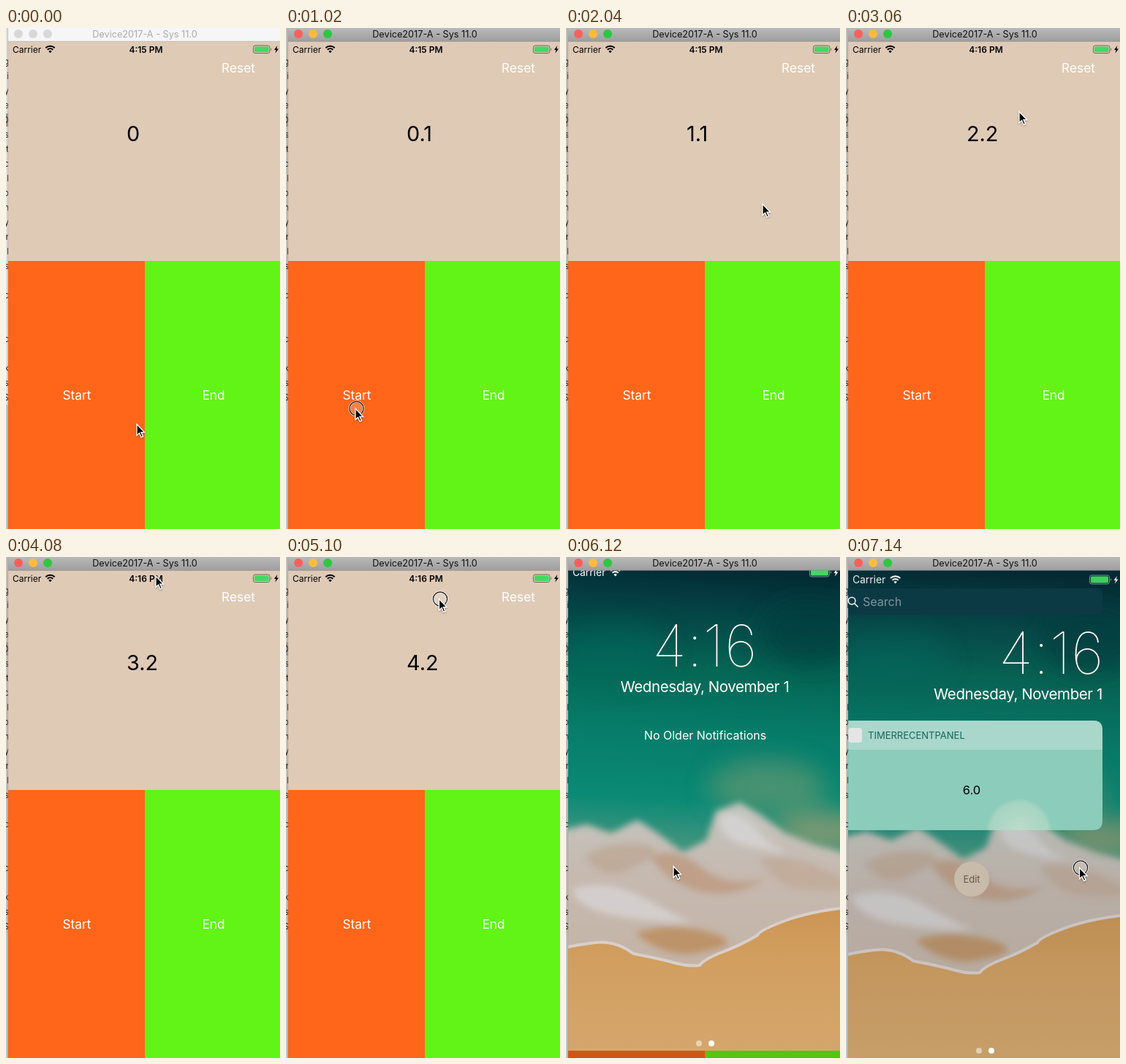
Animation, 375 px wide and 686 px high, one loop 8000 ms. Source, as an HTML page:

```html
<!DOCTYPE html>
<html lang="en">
<head>
<meta charset="utf-8">
<title>Stopwatch</title>
<style>
  html, body { margin: 0; width: 100%; height: 100%; overflow: hidden; background: #dfcab6; }
  svg { display: block; width: 100%; height: 100%; }
  text { font-family: Inter, "Open Sans", sans-serif; }
  .mid { text-anchor: middle; }
  .end { text-anchor: end; }
  .label { font-size: 17.3px; fill: #fff; text-anchor: middle; }
  .time { font-size: 79px; font-weight: 100; letter-spacing: .5px; }
  .date { font-size: 20.5px; letter-spacing: -.4px; }
</style>
</head>
<body>
<svg viewBox="0 0 375 686">
  <defs>
    <linearGradient id="barOn" x2="0" y2="1">
      <stop stop-color="#b9b9b9"/><stop offset="1" stop-color="#9e9e9e"/>
    </linearGradient>
    <linearGradient id="sea" gradientUnits="userSpaceOnUse" x1="170" y1="18" x2="150" y2="400">
      <stop stop-color="#032832"/><stop offset=".15" stop-color="#044044"/>
      <stop offset=".38" stop-color="#056655"/><stop offset=".6" stop-color="#067c69"/>
      <stop offset=".85" stop-color="#0b8a75"/><stop offset="1" stop-color="#3f947d"/>
    </linearGradient>
    <linearGradient id="sand" x2="0" y2="1">
      <stop stop-color="#cb9250"/><stop offset=".4" stop-color="#d19e5f"/><stop offset="1" stop-color="#d5a66c"/>
    </linearGradient>
    <linearGradient id="surf" x2="0" y2="1">
      <stop stop-color="#c3c6bf"/><stop offset=".4" stop-color="#c6b9b0"/><stop offset="1" stop-color="#c4b3a5"/>
    </linearGradient>
    <radialGradient id="glow" gradientUnits="userSpaceOnUse" cx="237" cy="376" r="46">
      <stop stop-color="#cfe0cf" stop-opacity=".75"/><stop offset=".85" stop-color="#b9dbc8" stop-opacity=".6"/>
      <stop offset="1" stop-color="#b9dbc8" stop-opacity="0"/>
    </radialGradient>
    <filter id="soft" x="-60%" y="-60%" width="220%" height="220%"><feGaussianBlur stdDeviation="16"/></filter>
    <filter id="fuzz" x="-20%" y="-20%" width="140%" height="140%"><feGaussianBlur stdDeviation="5"/></filter>
    <filter id="shade" x="-50%" y="-50%" width="200%" height="200%">
      <feDropShadow dx="0" dy="1" stdDeviation=".9" flood-opacity=".4"/>
    </filter>
    <clipPath id="phone"><path d="M3 18h372v668H3z"/></clipPath>
    <path id="shore" d="M385 490Q335 495 300 508T262 528Q238 542 214 551T183 569Q168 571 150 566T92 553Q68 535 40 538T-8 547"/>
    <clipPath id="water"><path d="M-8 18H385V490Q335 495 300 508T262 528Q238 542 214 551T183 569Q168 571 150 566T92 553Q68 535 40 538T-8 547z"/></clipPath>
    <g id="wifi" fill="none" stroke="currentColor" stroke-width="2">
      <path d="M.8 3.7a9 9 0 0 1 12.4 0M3.2 6.3a5.5 5.5 0 0 1 7.6 0"/>
      <path d="M7 10.7 4.9 8.4a3 3 0 0 1 4.2 0z" fill="currentColor" stroke="none"/>
    </g>
    <path id="bolt" d="M4.4 0 0 6h2.6L1.5 10.5 6 4.4H3.3z" fill="currentColor"/>
  </defs>

  <!-- sliver of the desktop behind the window -->
  <rect id="desk" width="3" height="686"/>
  <path d="M0 117h3v18H0z" fill="#999"/>
  <path d="M0 516h3v170H0z" fill="#b4c8d2"/>
  <g id="slivers" font-size="12" fill="#222" class="end"></g>
  <path d="M2.6 0v686" stroke="#777" stroke-opacity=".45" stroke-width=".8"/>

  <g id="app">
    <path d="M3 18h372v301H3z" fill="#dfcab6"/>
    <path d="M3 319h187v367H3z" fill="#ff661a"/>
    <path d="M190 319h185v367H190z" fill="#62f317"/>
    <g color="#000">
      <text x="9" y="33.5" font-size="12">Carrier</text>
      <use href="#wifi" x="53.5" y="23.5"/>
      <text id="clock" class="mid" x="191.5" y="33.5" font-size="12" font-weight="600"></text>
      <rect x="338.5" y="24" width="22.5" height="10.5" rx="2.6" fill="none" stroke="#6d655c"/>
      <rect x="340" y="25.5" width="19.5" height="7.5" rx="1.4" fill="#44d862"/>
      <path d="M362.6 27.3q2 2 0 4z" fill="#6d655c"/>
      <use href="#bolt" x="367" y="24"/>
    </g>
    <text class="label" x="318" y="60.5">Reset</text>
    <text id="count" x="165" y="154.5" font-size="28.8"></text>
    <text class="label" x="97" y="509">Start</text>
    <text class="label" x="284" y="509">End</text>
  </g>
  <path id="dim" d="M3 18h372v668H3z" fill-opacity=".18"/>

  <g id="cover">
    <g clip-path="url(#phone)">
      <path d="M3 470h372v216H3z" fill="url(#sand)"/>
      <g clip-path="url(#water)">
        <path d="M3 18h372v560H3z" fill="url(#sea)"/>
        <g filter="url(#soft)">
          <ellipse cx="335" cy="115" rx="70" ry="45" fill="#023c3c" opacity=".55"/>
          <ellipse cx="70" cy="140" rx="70" ry="40" fill="#0a6d62" opacity=".4"/>
          <ellipse cx="275" cy="325" rx="80" ry="38" fill="#6f9a70" opacity=".6"/>
          <ellipse cx="350" cy="385" rx="60" ry="28" fill="#8b9a70" opacity=".8"/>
        </g>
        <path d="M-20 388 28 376 62 388 98 370 122 386 160 414 192 398 205 358 238 346 265 362 300 388 340 404 400 420V590H-20z"
              fill="url(#surf)" filter="url(#fuzz)"/>
        <g filter="url(#fuzz)">
          <path d="M115 420Q150 405 185 435T275 450Q230 478 185 468T115 420z" fill="#bd9577" opacity=".7"/>
          <path d="M25 420Q60 398 105 404T80 440Q50 452 25 420z" fill="#b99b82" opacity=".5"/>
          <path d="M95 525Q145 508 200 525T165 554Q125 552 95 525z" fill="#bb8b59" opacity=".8"/>
          <path d="M265 424Q305 412 365 443T310 463Q280 451 265 424z" fill="#bea087" opacity=".5"/>
          <path d="M210 365Q238 354 263 385T318 416Q280 414 245 405T210 365zM8 465Q55 449 105 476T174 511Q105 510 60 500T8 465z" fill="#d9d7da" opacity=".7"/>
        </g>
      </g>
      <use href="#shore" fill="none" stroke="#d8cfca" stroke-width="4"/>
    </g>
    <g fill="#fff" color="#fff">
      <text x="9" y="36" font-size="13.8">Carrier</text>
      <use href="#wifi" transform="translate(60 25) scale(1.08)"/>
      <rect x="333.5" y="25" width="27" height="12" rx="3" fill="none" stroke="#7f9a9c"/>
      <rect x="335" y="26.5" width="24" height="9" rx="1.6" fill="#44d862"/>
      <path d="M362 29q2.4 2 0 4z" fill="#7f9a9c"/>
      <use href="#bolt" x="366.5" y="26"/>
    </g>
    <g id="notices" fill="#fff" class="mid">
      <text class="time" x="190" y="159.5">4:16</text>
      <text class="date" x="190" y="195">Wednesday, November 1</text>
      <text x="190.5" y="260" font-size="16">No Older Notifications</text>
    </g>
    <g id="today">
      <path d="M3 18h372v668H3z" fill="#284050" fill-opacity=".08"/>
      <path d="M3 43h341q7 0 7 7v22q0 7-7 7H3z" fill="#0b3a45"/>
      <g fill="none" stroke="#fff" stroke-width="1.4"><circle cx="8" cy="60" r="4.8"/><path d="m11.5 63.5 5 5"/></g>
      <text x="23" y="67" font-size="16" fill="#80969b">Search</text>
      <g fill="#fff" class="end">
        <text class="time" x="353" y="159.5">4:16</text>
        <text class="date" x="351" y="195">Wednesday, November 1</text>
      </g>
      <path d="M3 224h335q13 0 13 13v124q0 13-13 13H3z" fill="#8bccba"/>
      <path d="M191 374a46 44 0 0 1 92 0z" fill="url(#glow)"/>
      <path d="M3 224h335q13 0 13 13v27H3z" fill="#a9d7cb"/>
      <rect x="3" y="234" width="19" height="20" rx="4" fill="#e4e6e5"/>
      <text x="30" y="249" font-size="13" fill="#17655a">TIMERRECENTPANEL</text>
      <text class="mid" x="172" y="325" font-size="16.5">6.0</text>
      <circle cx="172" cy="441" r="24" fill="#c9bba9"/>
      <text class="mid" x="172" y="445.7" font-size="13" fill="#66564a">Edit</text>
    </g>
    <circle cx="182" cy="676" r="4" fill="#fff" fill-opacity=".5"/>
    <circle cx="199" cy="676" r="4" fill="#fff"/>
  </g>

  <rect id="bar" x="3" width="372" height="18.5"/>
  <path d="M3 18.3h372" stroke="#777" stroke-opacity=".5" stroke-width=".7"/>
  <g id="lights"><circle cx="17" cy="8" r="6"/><circle cx="37" cy="8" r="6"/><circle cx="57" cy="8" r="6"/></g>
  <text id="title" class="mid" x="190" y="13" font-size="12.7">Device2017-A - Sys 11.0</text>

  <g id="pointer">
    <g id="press" fill="none">
      <circle cx="1.5" r="9.6" fill="#fff" fill-opacity=".18" stroke="#fff" stroke-opacity=".75" stroke-width="2.8"/>
      <circle cx="1.5" r="9.6" stroke="#111" stroke-width="1.2"/>
    </g>
    <path d="M0 0v15.2l3.5-3.2 2.6 5.8 2.4-1.1-2.6-5.6h4.6z" stroke="#fff" stroke-width="1.3" filter="url(#shade)"/>
  </g>
</svg>
<script>
const $ = id => document.getElementById(id);
const STEP = 1020, LOOP = 8000;

// count, clock, pointer x, pointer y, pressed, screen
const steps = [
  ["0",   "4:15 PM", 179,   542.5, false, "app"],
  ["0.1", "4:15 PM", 95,    521,   true,  "app"],
  ["1.1", "4:15 PM", 269,   241,   false, "app"],
  ["2.2", "4:16 PM", 237,   114.5, false, "app"],
  ["3.2", "4:16 PM", 205,   26,    false, "app"],
  ["4.2", "4:16 PM", 209.5, 57.5,  true,  "app"],
  ["5.1", "4:16 PM", 147,   423.5, false, "notices"],
  ["6.0", "4:16 PM", 319.5, 425.5, true,  "today"],
];

const rows = "giyeDstclonyrls c  c ksS";
$("slivers").innerHTML = [...rows]
  .map((c, i) => `<text x="4" y="${50 + i * 20}">${c}</text>`).join("");

const show = (id, on) => $(id).setAttribute("display", on ? "inline" : "none");
const fill = (node, color) => node.setAttribute("fill", color);

function render(index) {
  const [count, clock, x, y, pressed, screen] = steps[index];
  const active = index > 0;
  $("count").textContent = count;
  $("clock").textContent = clock;
  $("pointer").setAttribute("transform", `translate(${x} ${y})`);
  show("press", pressed);

  const covered = screen !== "app";
  show("dim", covered);
  show("cover", covered);
  show("notices", screen === "notices");
  show("today", screen === "today");
  $("cover").setAttribute("transform", `translate(0 ${screen === "notices" ? -10 : 0})`);

  fill($("bar"), active ? "url(#barOn)" : "#f6f6f6");
  fill($("title"), active ? "#111" : "#ababab");
  fill($("desk"), active ? "#bdbfc1" : "#dcdfe2");
  const colors = active ? ["#fc605c", "#fdbc40", "#2bc840"] : Array(3).fill("#d8d8d8");
  [...$("lights").children].forEach((dot, i) => fill(dot, colors[i]));
}

let shown = -1;
const start = performance.now();
function tick() {
  const t = (performance.now() - start) % LOOP;
  const index = Math.min(steps.length - 1, Math.floor(t / STEP));
  if (index !== shown) render(shown = index);
  requestAnimationFrame(tick);
}
tick();
</script>
</body>
</html>
```
